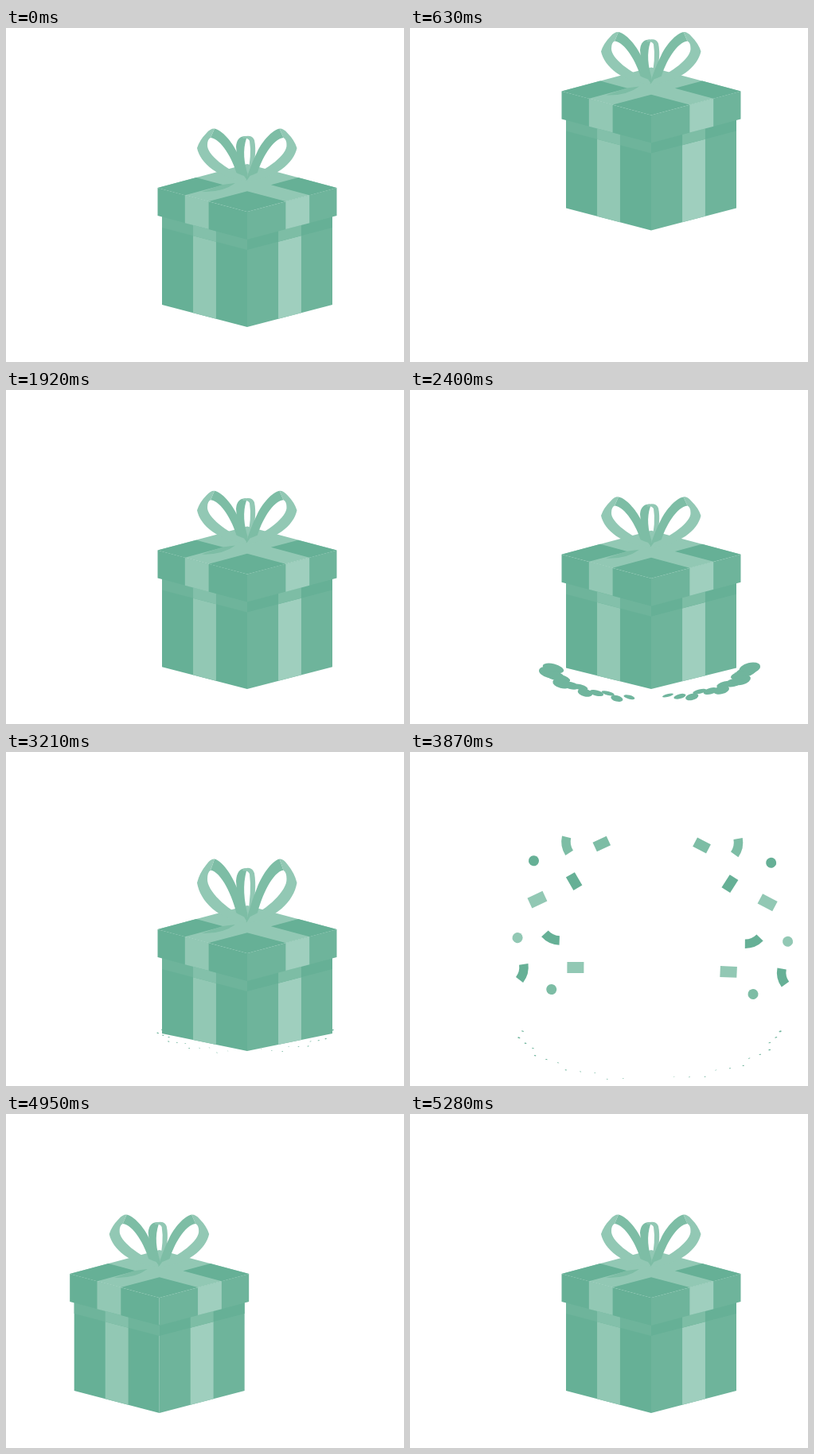
An HTML page with a canvas for the animation above (5310 ms loop, 500 by 420 pixels).

```html
<!DOCTYPE html>
<html lang="en">
<head>
<meta charset="utf-8">
<title>Gift box</title>
<style>
html, body { margin: 0; width: 100%; height: 100%; overflow: hidden; background: #fff; }
canvas { display: block; }
</style>
</head>
<body>
<canvas id="stage" width="500" height="420"></canvas>
<script>
const ctx = document.getElementById('stage').getContext('2d');
const LOOP = 5310, HOP = 1590, LAND = 752, CROUCH = 3010, LEAP = 3222, ENTER = 4760;
const MID = 303, GROUND = 376, LID = 112.5, BODY = 107;
const DARK = '#66b096', SIDE = '#6eb49b', TONE = '#7dbda5', LIGHT = '#92c8b4', PALE = '#9fcfbe';

const span = (t, a, b) => Math.max(0, Math.min(1, (t - a) / (b - a)));
const smooth = u => u * u * (3 - 2 * u);
const out = (u, p) => 1 - Math.pow(1 - u, p);

function fillPath(color, points) {
  ctx.fillStyle = color;
  ctx.beginPath();
  for (const [x, y] of points) ctx.lineTo(x, y);
  ctx.closePath();
  ctx.fill();
}

function shape(color, d) {
  ctx.fillStyle = color;
  ctx.fill(new Path2D(d));
}

// Part of a front face: side -1 or 1, a..b from the outer edge (0) to the middle (1)
function wall(color, side, a, b, half, top, topDrop, low, lowDrop) {
  const x = f => MID + side * half * (1 - f);
  fillPath(color, [
    [x(a), top + topDrop * a], [x(b), top + topDrop * b],
    [x(b), low + lowDrop * b], [x(a), low + lowDrop * a]
  ]);
}

// Part of the lid's upper face; u runs to the right corner, v to the left one
function tile(color, u0, v0, u1, v1) {
  const at = (u, v) => [MID + (u - v) * LID, 171 + (u + v) * 30];
  fillPath(color, [at(u0, v0), at(u1, v0), at(u1, v1), at(u0, v1)]);
}

function bowSide(flip) {
  ctx.save();
  if (flip) { ctx.translate(MID * 2 - 0.5, 0); ctx.scale(-1, 1); }
  shape(TONE, 'M257 138 L262 126.5 C271 128 284 143 290 156 Q299 174 304 192 L290 184 C285 165 270 139 257 138 Z');
  shape(LIGHT, 'M262 126.5 Q257 126 252 132 Q243 141 240 151 C244 170 266 189 304 193 L299 186 C278 179 252 159 253 147 Q253 140 257 138 Z');
  ctx.restore();
}

function bow(d, b) {
  ctx.save();
  ctx.translate(0, 190 + d);
  ctx.scale(1, (64 + d - b) / 64);
  ctx.translate(0, -190);
  shape(TONE, 'M301 136 Q290 136 289 149 Q290 172 300 188 L305 188 Q295 160 302 139 Z');
  shape(LIGHT, 'M297 137 Q309 133 312 141 Q316 160 307 187 L303 187 Q309 160 306 142 Q304 138 298 139 Z');
  bowSide(false);
  bowSide(true);
  ctx.restore();
}

// d lowers the lid, b lowers the top of the bow
function box(x, y, d, b) {
  ctx.save();
  ctx.translate(x, y);
  const top = 237 + d, low = 348 + 0.27 * d;
  for (const side of [-1, 1]) {
    const [face, shadow, ribbon, dim] = side < 0 ? [DARK, SIDE, LIGHT, '#83c0aa'] : [SIDE, DARK, PALE, TONE];
    const body = (color, a, b) => wall(color, side, a, b, BODY, top, 28, low, GROUND - low);
    const shade = (color, a, b) => wall(color, side, a, b, BODY, top, 28, top + 14, 28);
    const rim = (color, a, b) => wall(color, side, a, b, LID, 201 + d, 30, 236 + d, 30);
    body(face, 0, 1);
    body(ribbon, 0.365, 0.635);
    shade(shadow, 0, 1);
    shade(dim, 0.365, 0.635);
    rim(face, 0, 1);
    rim(ribbon, 0.305, 0.57);
  }
  ctx.translate(0, d);
  tile(LIGHT, 0, 0, 1, 1);
  tile(DARK, 0, 0.57, 0.305, 1);
  tile(DARK, 0.57, 0, 1, 0.305);
  tile(DARK, 0.57, 0.57, 1, 1);
  shape(TONE, 'M246 206 L272 197 L288 195 Q272 207 246 206 Z');
  ctx.translate(0, -d);
  bow(d, b);
  ctx.restore();
}

// Flat puffs that swell, run outward along the ground and shrink to specks
function dust(age, life) {
  const u = age / life;
  if (u <= 0 || u >= 1) return;
  const size = Math.min(1, u * 12) * (1 - Math.pow(u, 1.6));
  const rx = 106 + 56 * out(u, 3), ry = 28 + 36 * out(u, 3);
  ctx.fillStyle = '#70b59d';
  for (const side of [-1, 1]) {
    for (let i = 0; i < 12; i++) {
      const a = 0.05 + i * 0.12, wave = Math.sin(i * 2.1 + side);
      ctx.beginPath();
      ctx.ellipse(MID - 3 + side * (rx + 4 * wave) * Math.cos(a), 348 + (ry + 3 * wave) * Math.sin(a),
        (14 - 0.6 * i) * size, (6.5 - 0.35 * i + wave) * size, side * -0.25, 0, 7);
      ctx.fill();
    }
  }
}

// Resting x, y and angle; kinds repeat as strip, arc, dot
const bits = [
  [233, 128, -40], [183, 130, 155], [162, 334, 0],
  [194, 181, 45], [162, 262, 100], [137, 152, 0],
  [142, 207, -40], [122, 310, 0], [114, 261, 0],
  [196, 303, -15]
];

function bit(kind, color) {
  ctx.fillStyle = ctx.strokeStyle = color;
  ctx.beginPath();
  if (kind === 0) {
    const w = color === LIGHT ? 21 : 19;
    ctx.fillRect(-w / 2, -w / 3, w, w / 1.5);
  } else if (kind === 1) {
    ctx.lineWidth = 11.5;
    ctx.arc(-26, 0, 26, -0.4, 0.4);
    ctx.stroke();
  } else {
    ctx.arc(0, 0, 6.5, 0, 7);
    ctx.fill();
  }
}

function confetti(t) {
  for (const side of [1, -1]) {
    const age = t - 3356 + side * -21;
    if (age <= 0 || t > 4860) continue;
    const rest = Math.exp(-age / 225), size = span(age, 0, 90);
    ctx.save();
    ctx.globalAlpha = 1 - span(t, 4640, 4860);
    ctx.translate(MID, 15);
    ctx.scale(side, 1);
    bits.forEach(([x, y, angle], i) => {
      const kind = i % 3, row = Math.floor(i / 3);
      const color = row === 0 ? TONE : row === 1 || kind === 1 ? DARK : LIGHT;
      ctx.save();
      ctx.translate((x - MID) * (1 - rest), (y - 15) * (1 - rest));
      ctx.scale(size, size);
      ctx.rotate((angle + 135 * rest) * Math.PI / 180);
      bit(kind, color);
      ctx.restore();
    });
    ctx.restore();
  }
}

function hop(p) {
  const lift = 122 * (p < 650 ? out(span(p, 350, 650), 2) : 1 - Math.pow(span(p, 650, LAND), 2));
  const crouch = 20 * Math.pow(Math.sin(Math.PI * span(p, 0, 350)), 2);
  const a = span(p, LAND, LAND + 560);
  const spring = 10 * Math.sin(2 * Math.PI * a) * Math.exp(-0.8 * a);
  box(0, -lift, crouch + spring, 0.4 * crouch + 1.4 * spring);
}

function leap(t) {
  const crouch = smooth(span(t, CROUCH, LEAP - 17)), fling = smooth(span(t, LEAP, LEAP + 70));
  box(0, -400 * out(span(t, LEAP, LEAP + 185), 1.4), 22 * crouch - 30 * fling, 8 * crouch - 16 * fling);
}

function draw(t) {
  ctx.fillStyle = '#fff';
  ctx.fillRect(0, 0, 500, 420);
  dust(t - LAND, 500);
  dust(t - LAND - HOP, 500);
  dust(t - LEAP + 17, 720);
  confetti(t);
  if (t < CROUCH) hop(t % HOP);
  else if (t < LEAP + 185) leap(t);
  else if (t > ENTER) box(-415 * (1 - out(span(t, ENTER, 5295), 3)), 0, 0, 0);
}

const start = performance.now();
function tick() {
  draw((performance.now() - start) % LOOP);
  requestAnimationFrame(tick);
}
tick();
</script>
</body>
</html>
```
